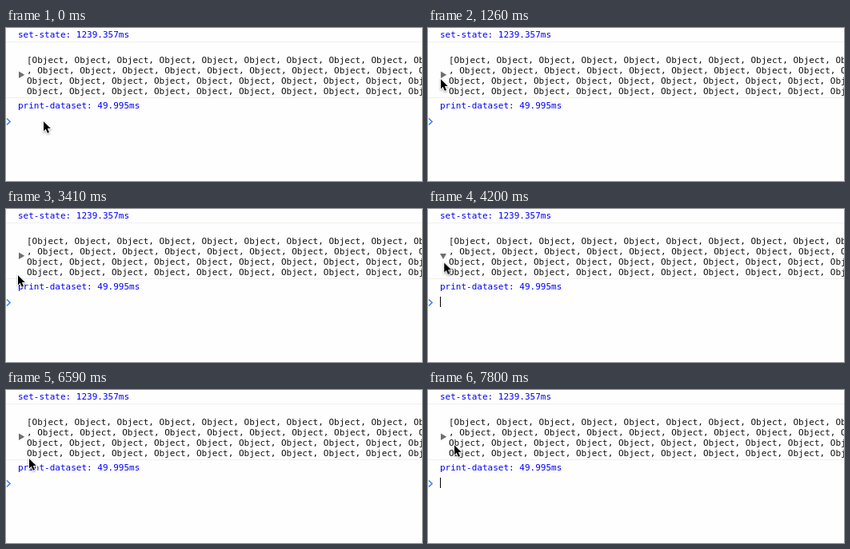
These frames come from a looping animation (520 px wide and 192 px high, 8 s). An HTML page:

```html
<!DOCTYPE html>
<html lang="en">
<head>
<meta charset="utf-8">
<title>Console</title>
<style>
  html, body { margin: 0; width: 100%; height: 100%; overflow: hidden; background: #fefefe; }
  svg { display: block; width: 520px; height: 192px; }
  text { font: 11px "DejaVu Sans Mono", "Liberation Mono", monospace; white-space: pre; }
  .log { fill: #00f; }
  .list { fill: #111; font-style: italic; }
  .rule { fill: #f0f0f0; }
  .prompt { fill: none; stroke: #3f87f5; stroke-width: 1.7; }
  .arrow { fill: #6e6e6e; }
  .open, .closed, .caret { animation: 8s step-end infinite; }
  .open { animation-name: open; }
  .closed { animation-name: closed; }
  .caret { animation-name: blink; }
  .mouse { animation: move 8s linear infinite; filter: drop-shadow(0 1px .8px rgba(0, 0, 0, .35)); }
  .mouse path { stroke: #fff; stroke-width: 1.8; paint-order: stroke; }

  @keyframes open {
    0%, 31.87%, 72.37%, 100% { opacity: 0; }
    20.74%, 50.62% { opacity: 1; }
  }
  @keyframes closed {
    0%, 31.87%, 72.37%, 100% { opacity: 1; }
    20.74%, 50.62% { opacity: 0; }
  }
  @keyframes blink {
    0%, 27.12%, 38.24%, 48.87%, 56.8%, 69%, 78.74%, 90.74% { opacity: 0; }
    20.74%, 31.87%, 42.99%, 50.62%, 63.12%, 72.37%, 85%, 97.12%, 100% { opacity: 1; }
  }
  /* Each move is a short burst of pointer samples, then a rest. */
  @keyframes move {
    0% { transform: translate(46px, 115px); }
    3.62% { transform: translate(46px, 115px); animation-timing-function: steps(3, start); }
    4.6% { transform: translate(21px, 73px); animation-timing-function: steps(3, start); }
    5.57% { transform: translate(7px, 50px); }
    7.5% { transform: translate(7px, 50px); animation-timing-function: steps(7, start); }
    11.87% { transform: translate(18px, 67px); }
    14.62% { transform: translate(18px, 67px); animation-timing-function: steps(4, start); }
    16.1% { transform: translate(15px, 62px); }
    16.87% { transform: translate(15px, 62px); animation-timing-function: steps(2, start); }
    18.2% { transform: translate(11px, 60px); animation-timing-function: steps(2, start); }
    19.53% { transform: translate(17px, 58px); }
    23% { transform: translate(17px, 58px); animation-timing-function: steps(2, start); }
    24.5% { transform: translate(17px, 60px); }
    33.75% { transform: translate(17px, 60px); animation-timing-function: steps(2, start); }
    35.25% { transform: translate(22px, 60px); }
    38.24% { transform: translate(22px, 60px); animation-timing-function: steps(6, start); }
    40.35% { transform: translate(13px, 69px); }
    42.6% { transform: translate(13px, 69px); animation-timing-function: steps(1, start); }
    42.99% { transform: translate(14px, 81px); animation-timing-function: steps(9, start); }
    47.5% { transform: translate(17px, 69px); }
    50.62% { transform: translate(17px, 69px); animation-timing-function: steps(4, start); }
    53.62% { transform: translate(20px, 64px); }
    55.12% { transform: translate(20px, 64px); animation-timing-function: steps(4, start); }
    56.48% { transform: translate(55px, 106px); animation-timing-function: steps(4, start); }
    57.83% { transform: translate(77px, 132px); }
    65% { transform: translate(77px, 132px); animation-timing-function: steps(3, start); }
    66.05% { transform: translate(43px, 95px); animation-timing-function: steps(3, start); }
    67.1% { transform: translate(25px, 75px); }
    82.35% { transform: translate(25px, 75px); animation-timing-function: steps(1, start); }
    82.73% { transform: translate(28px, 84px); animation-timing-function: steps(4, start); }
    84.18% { transform: translate(44px, 112px); animation-timing-function: steps(4, start); }
    85.6% { transform: translate(49px, 122px); }
    96% { transform: translate(49px, 122px); animation-timing-function: steps(5, start); }
    97.8%, 100% { transform: translate(32px, 67px); }
  }
</style>
</head>
<body>
<svg viewBox="0 0 520 192">
  <rect class="rule" y="17" width="520" height="1"/>
  <rect class="rule" y="87" width="520" height="1"/>
  <text class="log" x="15" y="12">set-state: 1239.357ms</text>
  <g class="list">
    <text x="26" y="44">[Object, Object, Object, Object, Object, Object, Object, Object, Object, Object</text>
    <text x="26" y="57">, Object, Object, Object, Object, Object, Object, Object, Object, Object, Object</text>
    <text x="26" y="70">Object, Object, Object, Object, Object, Object, Object, Object, Object, Object</text>
    <text x="26" y="83">Object, Object, Object, Object, Object, Object, Object, Object, Object, Object</text>
  </g>
  <text class="log" x="15" y="101">print-dataset: 49.995ms</text>
  <path class="arrow closed" d="M16 54.5 23.3 58.8 16 63z"/>
  <path class="arrow open" d="M15 56H23L19 63z"/>
  <path class="prompt" d="M1 113.5 5 117.5 1 121.5"/>
  <rect class="caret" x="15" y="110" width="1" height="13"/>
  <g class="mouse"><path d="M1 2.2V14.4L3.7 11.8 5.8 16.8 8 15.9 5.9 11H9.8z"/></g>
</svg>
</body>
</html>
```
